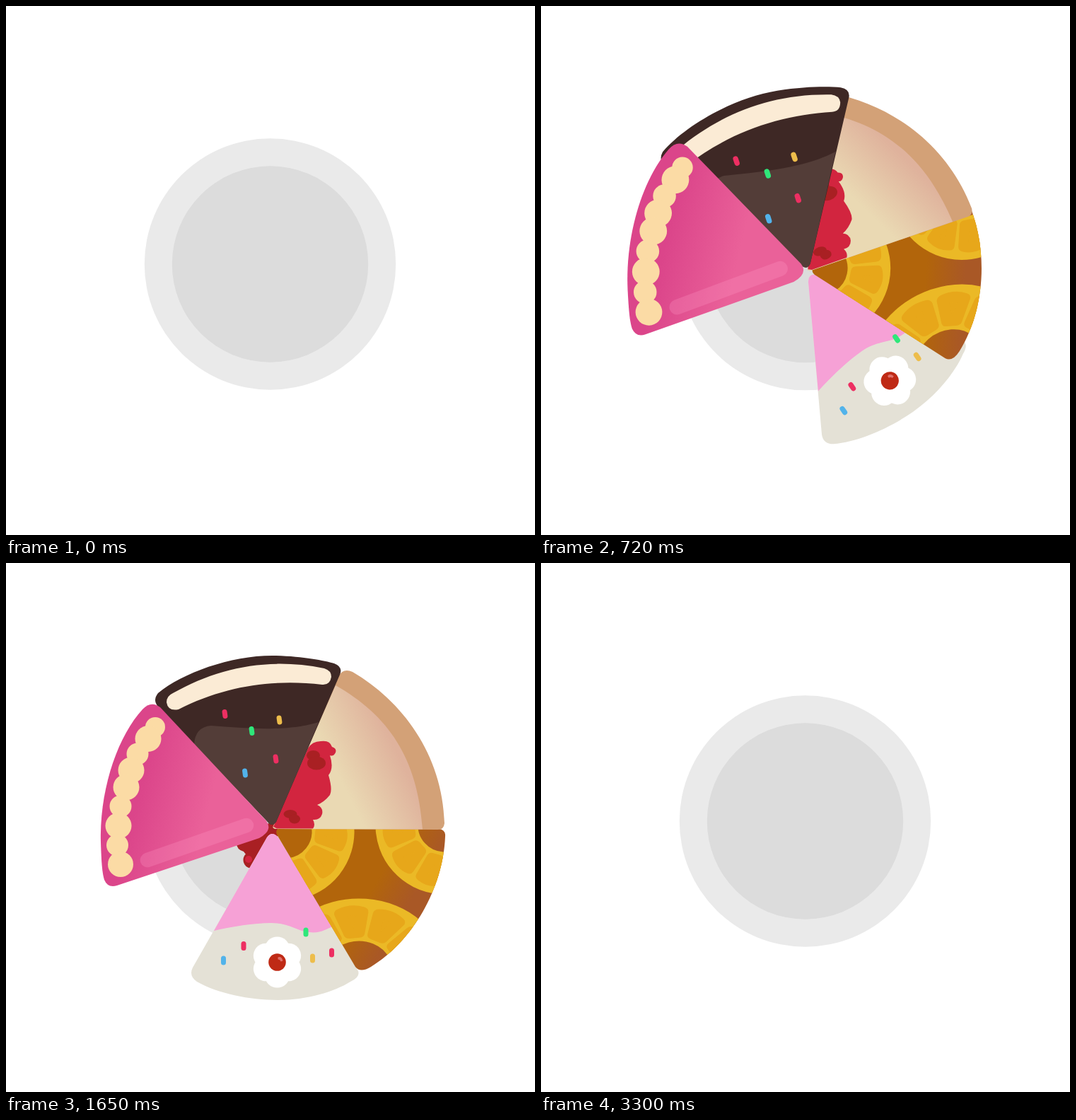
An HTML page without scripts for the animation above (3.57 s loop, 748 px wide and 748 px high).

```html
<!DOCTYPE html>
<html lang="en">
<head>
<meta charset="utf-8">
<title>Cake wheel</title>
<style>
  html, body { margin: 0; width: 100%; height: 100%; overflow: hidden; background: #fff; }
  svg { position: absolute; left: 0; top: 0; width: 748px; height: 748px; }

  .plate { transform-origin: 373.5px 365px; animation: pulse 3.57s infinite; }
  .pie { animation: bites 3.57s step-end infinite; }
  .spin, .slice, .sauce { transform-origin: 375.5px 374.5px; }
  .spin { animation: wobble 3.57s ease-in-out infinite; }
  .slice { animation: pop 3.57s linear var(--d) infinite both, fan 3.57s infinite both; }
  .sauce { animation: spill 3.57s infinite; }

  /* --i: place in the fan, --d: pop delay, --peak: overshoot */
  .pink   { --i: 0;    --d: 0s;    --peak: 1.12; }
  .choc   { --i: 1.08; --d: .034s; --peak: 1.08; }
  .cheese { --i: 2.12; --d: .1s;   --peak: 1.02; }
  .orange { --i: 3;    --d: .1s;   --peak: 1.01; }
  .cream  { --i: 3.95; --d: .13s;  --peak: 1.01; }

  @keyframes pulse {
    0% { scale: 1; animation-timing-function: ease-in-out; }
    11.2% { scale: 1.047; animation-timing-function: ease-in-out; }
    22.4%, 100% { scale: 1; }
  }
  @keyframes pop {
    0%, 5.6% { scale: 0; }
    11.76% { scale: .712; }
    13.45% { scale: .72; }
    15.13% { scale: .95; }
    15.97% { scale: 1.04; animation-timing-function: ease-out; }
    17.65% { scale: var(--peak); animation-timing-function: ease-in-out; }
    22.5% { scale: .99; }
    25.2% { scale: .991; animation-timing-function: ease-in-out; }
    30%, 100% { scale: 1; }
  }
  @keyframes fan {
    0%, 11.2% { rotate: calc(var(--i) * -60deg); animation-timing-function: ease-in; }
    15.97% { rotate: calc(var(--i) * -39.8deg); animation-timing-function: cubic-bezier(.3, .4, .5, 1); }
    23.8%, 100% { rotate: 0deg; }
  }
  @keyframes wobble {
    0%, 11.2% { rotate: -24deg; animation-timing-function: ease-in; }
    15.97% { rotate: -16.2deg; animation-timing-function: cubic-bezier(.3, .3, .5, 1); }
    25.21% { rotate: 6.8deg; }
    31.93% { rotate: -2.5deg; }
    38.66% { rotate: .9deg; }
    44.8%, 100% { rotate: 0deg; }
  }
  @keyframes spill {
    0%, 27% { scale: 0; animation-timing-function: linear; }
    31.93% { scale: .53; animation-timing-function: cubic-bezier(.3, .4, .7, .9); }
    46.22%, 100% { scale: 1; }
  }
  @keyframes bites {
    0% { opacity: 0; clip-path: none; }
    5.6% { opacity: 1; clip-path: none; }
    70.59% { opacity: 1; clip-path: path("M262 100L259 161A59 59 0 0 1 251 198A53 53 0 0 1 260 287A86 86 0 0 1 233 401A52 52 0 0 1 252 424L252 748H748V0H262Z"); }
    78.99% { opacity: 1; clip-path: path("M355 100L355 131A90 90 0 0 1 398 222A139 139 0 0 1 418 472A105 105 0 0 1 380 620L380 748H748V0H355Z"); }
    86.55% { opacity: 1; clip-path: path("M620 215H566A70 70 0 0 1 532 266A118 118 0 0 1 540 478A60 60 0 0 1 563 534L748 534V215Z"); }
    92.44%, 100% { opacity: 0; clip-path: none; }
  }

  .sprinkles { stroke-width: 7; stroke-linecap: round; }
  .r { stroke: #ed2f62; }
  .y { stroke: #edbd4b; }
  .g { stroke: #2fe77a; }
  .b { stroke: #52b3ea; }
</style>
</head>
<body>
<svg viewBox="0 0 748 748">
  <g class="plate">
    <circle cx="373.5" cy="365" r="177.7" fill="#eaeaea"/>
    <circle cx="373.5" cy="365" r="138.7" fill="#dcdcdc"/>
  </g>
</svg>

<svg class="pie" viewBox="0 0 748 748">
  <defs>
    <linearGradient id="pinkFill" gradientUnits="userSpaceOnUse" x1="195" y1="300" x2="292" y2="325">
      <stop stop-color="#db458a"/><stop offset="1" stop-color="#ea6199"/>
    </linearGradient>
    <linearGradient id="cheeseFill" gradientUnits="userSpaceOnUse" x1="472" y1="305" x2="552" y2="265">
      <stop stop-color="#ead9b3"/><stop offset="1" stop-color="#dfb29c"/>
    </linearGradient>
    <linearGradient id="orangeFill" gradientUnits="userSpaceOnUse" x1="530" y1="440" x2="578" y2="468">
      <stop stop-color="#b2650b"/><stop offset="1" stop-color="#a95826"/>
    </linearGradient>
    <path id="orangeShape" d="M388 375L612 376Q622 377 621 387C618 460 575 535 516 571Q501 580 494 571L383 384Q380 376 388 375Z"/>
    <clipPath id="orangeClip"><use href="#orangeShape"/></clipPath>

    <path id="sprinkle" d="M0 -3v6"/>
    <path id="seg" d="M49 -5.5L78 -13Q84 0 78 13L49 5.5Z" fill="#e7a71a" stroke="#e7a71a" stroke-width="14" stroke-linejoin="round"/>
    <g id="wheel">
      <circle r="67.5" fill="none" stroke="#ebb926" stroke-width="60"/>
      <use href="#seg" transform="rotate(-66)"/>
      <use href="#seg" transform="rotate(-33)"/>
      <use href="#seg"/>
      <use href="#seg" transform="rotate(33)"/>
      <use href="#seg" transform="rotate(66)"/>
    </g>
    <circle id="petal" cy="-18.5" r="17.6"/>
  </defs>

  <g class="spin">
    <g class="sauce" fill="#a92023">
      <path d="M384 366L350 372L326 394Q325 405 336 408L350 426L384 392Z"/>
      <circle cx="347" cy="420" r="11.5"/>
      <circle cx="343" cy="419" r="5" fill="#d2253f"/>
    </g>

    <g class="slice cream">
      <path d="M369 388L264 572Q258 584 270 592C300 609 345 618 385 618C425 618 465 606 487 592Q501 586 498 577L385 388Q376 378 369 388Z" fill="#e4e1d6"/>
      <path d="M294 520C320 514 350 509 375 509S410 520 428 522S450 518 463 514L385 388Q376 378 369 388Z" fill="#f6a1d6"/>
      <g transform="translate(383.5 564.5)">
        <g fill="#fff">
          <circle r="22"/>
          <use href="#petal"/>
          <use href="#petal" transform="rotate(60)"/>
          <use href="#petal" transform="rotate(120)"/>
          <use href="#petal" transform="rotate(180)"/>
          <use href="#petal" transform="rotate(240)"/>
          <use href="#petal" transform="rotate(300)"/>
        </g>
        <circle r="12.3" fill="#bf2a15"/>
        <path d="M1 -7Q6 -9 8 -2L5 -1Q4 -4 1 -4Z" fill="#e0706a"/>
      </g>
      <g class="sprinkles">
        <use class="b" href="#sprinkle" x="307.5" y="562"/>
        <use class="r" href="#sprinkle" x="336" y="541.5"/>
        <use class="g" href="#sprinkle" x="424" y="522"/>
        <use class="y" href="#sprinkle" x="433.5" y="559"/>
        <use class="r" href="#sprinkle" x="460.5" y="551"/>
      </g>
    </g>

    <g class="slice orange">
      <use href="#orangeShape" fill="url(#orangeFill)"/>
      <g clip-path="url(#orangeClip)">
        <use href="#wheel" transform="translate(395 380) rotate(38.5)"/>
        <use href="#wheel" transform="translate(620 371) rotate(138.5)"/>
        <use href="#wheel" transform="translate(499 572) scale(1.22 1) rotate(-63.5)"/>
      </g>
    </g>

    <g class="slice cheese">
      <path d="M378 372L470 160Q477 148 490 154C560 195 617 270 620 368Q619 377 611 377L383 376Q376 376 378 372Z" fill="#d3a177"/>
      <path d="M378 372L466 173C540 215 582 275 589 376.5L383 376Q376 376 378 372Z" fill="url(#cheeseFill)"/>
      <path d="M378 373L427 262Q433 252 445 252Q458 250 461 260Q468 262 466 268Q463 274 458 272Q464 290 456 300Q462 320 458 328Q450 338 440 342Q449 346 447 355Q444 364 434 363Q438 370 434 375.5L383 375.5Z" fill="#d2253f"/>
      <g fill="#a92023">
        <ellipse cx="434.5" cy="272" rx="9.5" ry="7"/>
        <ellipse cx="439" cy="283" rx="13" ry="9.5"/>
        <ellipse cx="402" cy="355" rx="9.5" ry="6"/>
        <ellipse cx="408" cy="362" rx="8" ry="6.5"/>
      </g>
    </g>

    <g class="slice choc">
      <path d="M370 366L215 203Q207 194 215 184C250 155 320 130 380 131C420 132 450 138 464 142Q477 147 472 158L382 366Q376 374 370 366Z" fill="#3e2825"/>
      <path d="M266 257Q267 232 290 230C320 232 350 235 380 234S425 230 442 225L382 366Q376 374 370 366Z" fill="#533d38"/>
      <path d="M227 197Q227 188 236 184C300 148 370 133 450 149Q460 152 460 161Q458 173 447 172C380 164 310 173 244 207Q229 210 227 197Z" fill="#fbebd5"/>
      <g class="sprinkles">
        <use class="r" href="#sprinkle" transform="translate(309.5 213.5) rotate(-8)"/>
        <use class="y" href="#sprinkle" transform="translate(386.5 222) rotate(-8)"/>
        <use class="g" href="#sprinkle" transform="translate(347.5 237.5) rotate(-8)"/>
        <use class="r" href="#sprinkle" transform="translate(381.5 277) rotate(-8)"/>
        <use class="b" href="#sprinkle" transform="translate(338 297) rotate(-8)"/>
      </g>
    </g>

    <g class="slice pink">
      <path d="M368 364.5L218 204Q205 194 193 207C158 245 132 320 134 395C135 425 136 438 139 448Q144 460 157 456L358 389Q378 378 368 364.5Z" fill="url(#pinkFill)"/>
      <path d="M200 420L340 371" stroke="#ff9ac8" stroke-opacity=".25" stroke-width="20.5" stroke-linecap="round"/>
      <g fill="#fbdba5">
        <circle cx="211" cy="232" r="14"/>
        <circle cx="201" cy="248.5" r="18.5"/>
        <circle cx="186" cy="270" r="15.5"/>
        <circle cx="177" cy="293" r="18.5"/>
        <circle cx="170" cy="317" r="18.5"/>
        <circle cx="162" cy="344" r="15.5"/>
        <circle cx="159" cy="371.5" r="18.5"/>
        <circle cx="157.5" cy="399" r="15.5"/>
        <circle cx="162" cy="426" r="18"/>
      </g>
    </g>
  </g>
</svg>
</body>
</html>
```
